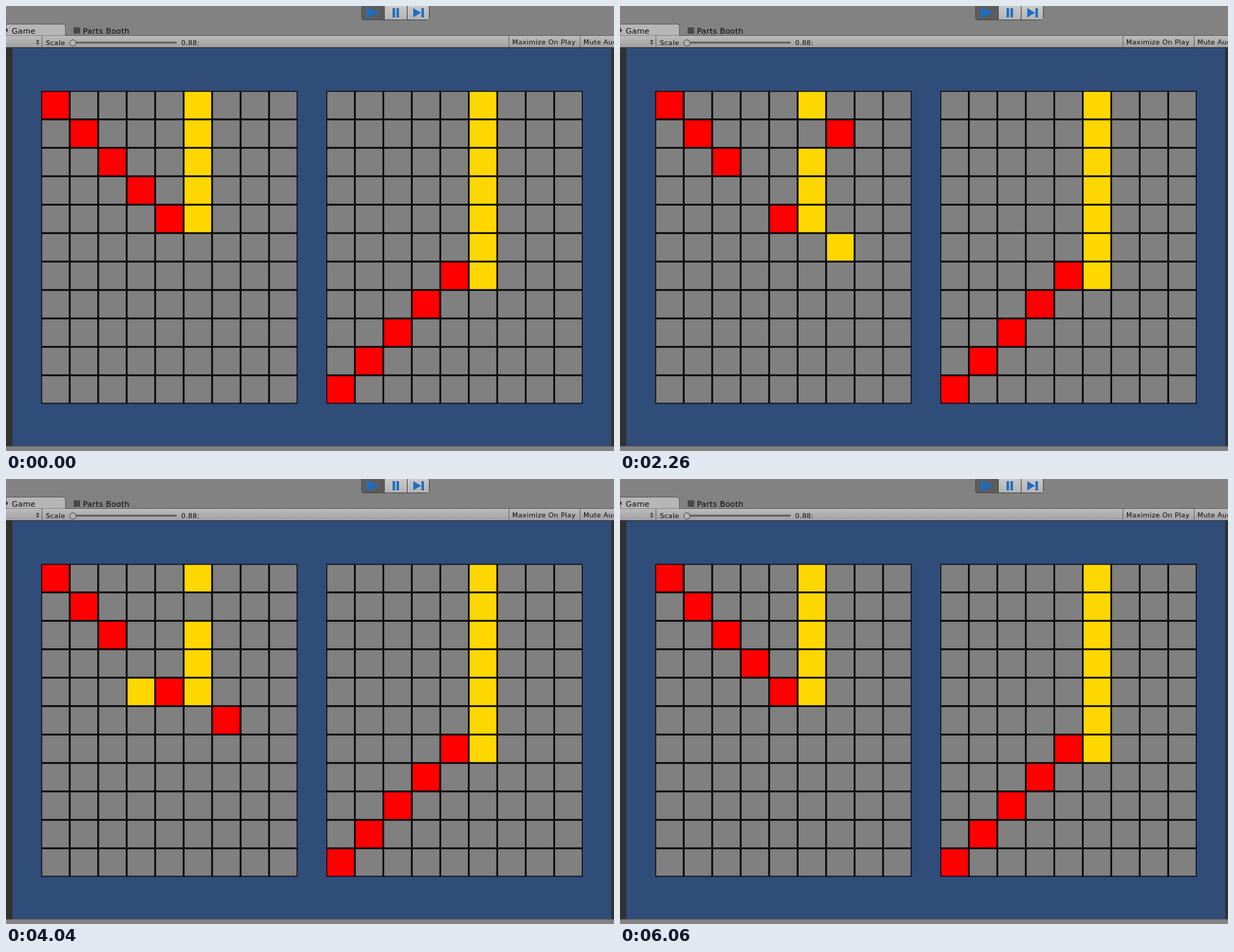
Recreate the animation shown at these times as an HTML page. Size 854x626 px, loop 6370 ms.

```html
<!DOCTYPE html>
<html lang="en">
<head>
<meta charset="utf-8">
<title>Tile ring</title>
<style>
  html, body { margin: 0; width: 100%; height: 100%; overflow: hidden; background: #828282; }
  svg { display: block; width: 854px; height: 626px; }
  text { font-family: "DejaVu Sans", sans-serif; fill: #0a0a0a; white-space: pre; }
  .tab { font-size: 11px; letter-spacing: .2px; }
  .bar { font-size: 9.5px; letter-spacing: .3px; }
  .icon { fill: #1f6dc1; }
  .tile { fill: #808080; }
  .red { fill: #f00; }
  .gold { fill: #ffd700; }
</style>
</head>
<body>
<svg viewBox="0 0 854 626" xmlns="http://www.w3.org/2000/svg">
  <defs>
    <linearGradient id="strip" x2="0" y2="1">
      <stop stop-color="#bcbcbc"/><stop offset="1" stop-color="#a0a0a0"/>
    </linearGradient>
    <linearGradient id="light" x2="0" y2="1">
      <stop stop-color="#c8c8c8"/><stop offset="1" stop-color="#b4b4b4"/>
    </linearGradient>
    <clipPath id="round"><rect x="499" y="-8" width="96" height="28" rx="4"/></clipPath>
  </defs>

  <rect width="854" height="626" fill="#828282"/>

  <!-- play controls -->
  <g clip-path="url(#round)">
    <rect x="499" width="96" height="20" fill="#4a4a4a"/>
    <rect x="500" width="31" height="19" fill="#5c5c5c"/>
    <rect x="532" width="31" height="19" fill="url(#light)"/>
    <rect x="564" width="30" height="19" fill="url(#light)"/>
  </g>
  <path class="icon" d="M507 1.5 524 9.5 507 17.5ZM543 3h3.5v13h-3.5ZM548.5 3h3.5v13h-3.5ZM572 3 583 9.5 572 16ZM583.5 3h3.5v13h-3.5Z"/>

  <!-- tabs -->
  <path d="M0 25.5H80Q83.500 25.500 83.500 29V42H0Z" fill="#b6b6b6" stroke="#5e5e5e"/>
  <circle cx="0" cy="34" r="2.500" fill="#333"/>
  <text class="tab" x="8" y="39">Game</text>
  <rect x="95" y="30" width="9" height="9" fill="#484848"/>
  <text class="tab" x="108" y="39">Parts Booth</text>

  <!-- toolbar -->
  <rect y="42" width="854" height="16" fill="url(#strip)"/>
  <path d="M84 41.500H854" stroke="#606060"/>
  <path d="M50.500 42V58M706.500 42V58M806.500 42V58" stroke="#6a6a6a"/>
  <path d="M42 50 44.500 47 47 50ZM42 51.500H47L44.500 54.500Z" fill="#3c3c3c"/>
  <text class="bar" x="56" y="55">Scale</text>
  <rect x="90" y="50" width="150" height="3" rx="1.500" fill="#686868"/>
  <circle cx="94" cy="52" r="4.300" fill="#b8b8b8" stroke="#444"/>
  <text class="bar" x="246" y="55">0.88:</text>
  <text class="bar" x="711" y="54">Maximize On Play</text>
  <text class="bar" x="811" y="54">Mute Audio</text>

  <!-- view -->
  <rect y="58" width="854" height="561" fill="#313131"/>
  <rect x="9" y="59" width="841" height="560" fill="#304d79"/>
  <path d="M0 619.500H854" stroke="#606060"/>
  <g id="boards"></g>
</svg>
<script>
  const COLS = 9, ROWS = 11, SIZE = 40, EDGE = 1.2, LOOP = 6370;
  const starts = [0, 230, 780, 1270, 1710, 2260, 2720, 3180, 3580, 4040, 4500, 4820, 5280, 5660, 6060];
  const boards = document.getElementById('boards');

  function rect(x, y, w, h) {
    const r = document.createElementNS('http://www.w3.org/2000/svg', 'rect');
    Object.entries({ x, y, width: w, height: h }).forEach(([k, v]) => r.setAttribute(k, v));
    return boards.appendChild(r);
  }

  function paint(tile, color = '') {
    tile.setAttribute('class', 'tile ' + color);
  }

  // Returns a lookup from column and row to tile.
  function board(left, top, colorAt) {
    rect(left, top, COLS * SIZE, ROWS * SIZE);
    const tiles = [];
    for (let row = 0; row < ROWS; row++) {
      for (let col = 0; col < COLS; col++) {
        const tile = rect(left + col * SIZE + EDGE, top + row * SIZE + EDGE, SIZE - 2 * EDGE, SIZE - 2 * EDGE);
        paint(tile, colorAt(col, row));
        tiles.push(tile);
      }
    }
    return (col, row) => tiles[row * COLS + col];
  }

  const tileAt = board(49.5, 119.5, (c, r) =>
    c === r && c < 5 && c !== 3 ? 'red' : c === 5 && r < 5 && r !== 1 ? 'gold' : '');
  board(450, 119.5, (c, r) =>
    c + r === 10 && c < 5 ? 'red' : c === 5 && r < 7 ? 'gold' : '');

  // Clockwise border of columns 3-6, rows 1-5, starting at (3, 3).
  const ring = [];
  let col = 3, row = 3;
  for (const [dx, dy, n] of [[0, -1, 2], [1, 0, 3], [0, 1, 4], [-1, 0, 3], [0, -1, 2]]) {
    for (let i = 0; i < n; i++) {
      ring.push(tileAt(col, row));
      col += dx;
      row += dy;
    }
  }

  let shown = -1;
  function draw(now) {
    const t = now % LOOP;
    const step = starts.filter(s => s <= t).length - 1;
    if (step !== shown) {
      shown = step;
      ring.forEach(tile => paint(tile));
      paint(ring[step % ring.length], 'red');
      paint(ring[(step + 4) % ring.length], 'gold');
    }
  }

  const begin = performance.now();
  function tick() {
    draw(performance.now() - begin);
    requestAnimationFrame(tick);
  }
  tick();
</script>
</body>
</html>
```
